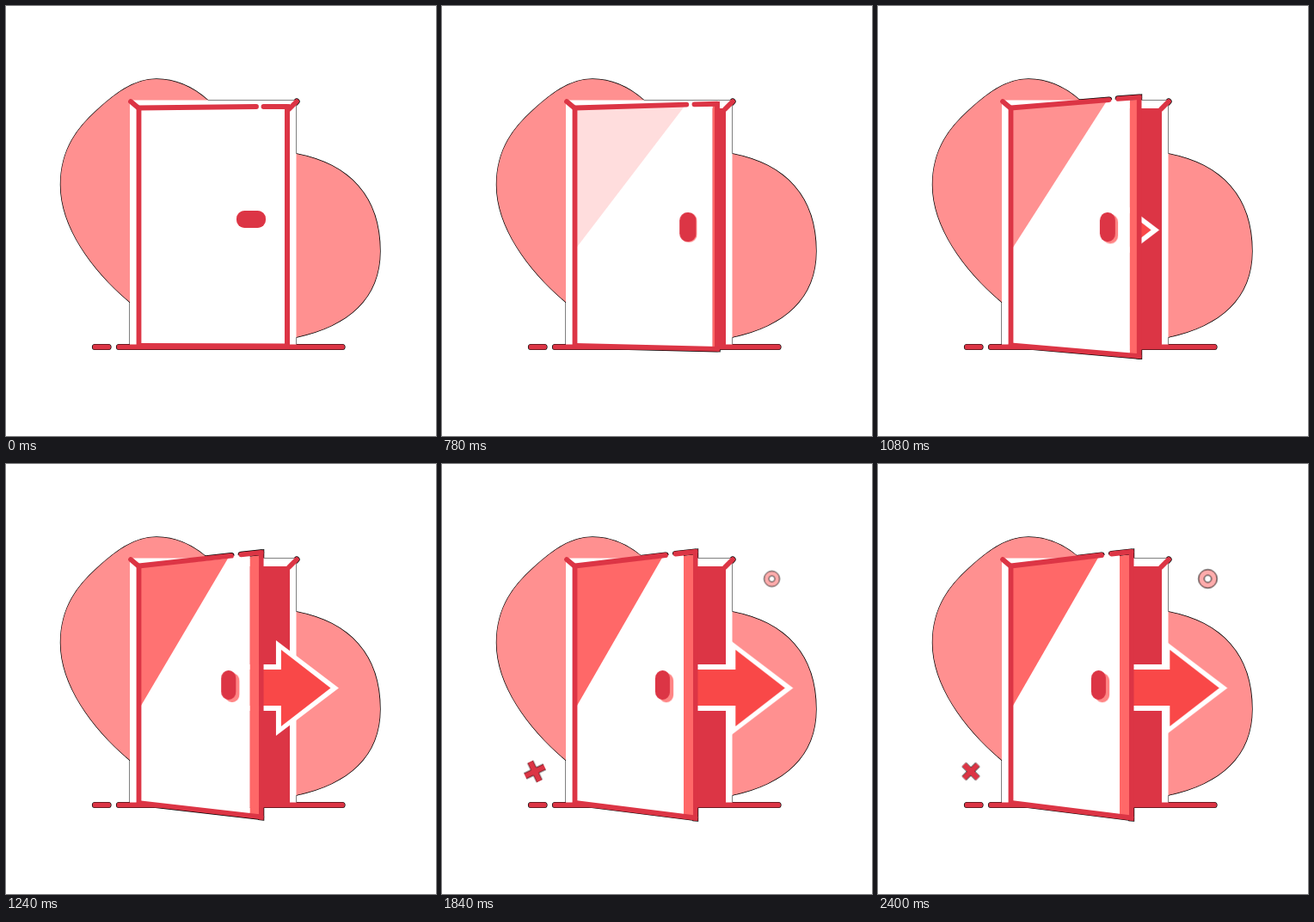
An HTML page without scripts that plays this animation: 500 by 500 pixels, repeating every 2420 ms.

```html
<!DOCTYPE html>
<html lang="en">
<head>
<meta charset="utf-8">
<title>Opening door</title>
<style>
html, body { margin: 0; width: 100%; height: 100%; overflow: hidden; background: #fff; }
svg { display: block; width: 100%; height: 100%; }

.red { fill: #dc3545; }
.pink { fill: #ff6868; }
.white { fill: #fff; }
.line { fill: none; stroke: #dc3545; stroke-width: 5.8; stroke-linecap: round; }
.rim { fill: #000; stroke: #000; stroke-width: 1.4; }
.rim .line { stroke: #000; stroke-width: 7.2; }

.move { animation: 2.42s linear infinite; }
.face { animation-name: face; }
.shine { animation-name: shine; }
.side { animation-name: side; }
.edge { animation-name: edge; }
.top { animation-name: top; }
.bottom { animation-name: bottom; }
.slide { animation-name: slide; }
.turn { animation-name: turn; }
.depth { animation-name: depth; }
.arrow { animation-name: arrow; }
.cross { animation-name: cross; }
.ring { animation-name: ring; }

/* The door swings from 600 to 1340 ms */
.swing { animation-timing-function: cubic-bezier(.3, .15, .7, .95); }
@keyframes face {
  0%, 24.8% { d: path("M154 118L324 117L324 395L154 395Z"); }
  55.4%, 100% { d: path("M154 118L281 104L281 409L154 394Z"); }
}
@keyframes shine {
  0%, 24.8% { d: path("M157 120L289 119L157 280Z"); opacity: 0; }
  55.4%, 100% { d: path("M157 120L256 109L157 281Z"); opacity: 1; }
}
@keyframes side {
  0%, 24.8% { d: path("M324 117L325 117L325 395L324 395Z"); }
  55.4%, 100% { d: path("M281 107L292.5 105.5L292.5 410L281 408Z"); }
}
@keyframes edge {
  0%, 24.8% { d: path("M324 115L330 114L330 398L324 397Z"); }
  55.4%, 100% { d: path("M292 100L297.5 99L297.5 415L292 414.5Z"); }
}
@keyframes top {
  0%, 24.8% { d: path("M154.5 118.5L291 117M299.5 117L327 117"); }
  55.4%, 100% { d: path("M154.5 118.5L260 106M271.5 104.5L294.5 102"); }
}
@keyframes bottom {
  0%, 24.8% { d: path("M154.5 395L327 395.5"); }
  55.4%, 100% { d: path("M154.5 394L294.5 411.5"); }
}
@keyframes slide {
  0%, 24.8% { transform: translate(294px, 248px) scaleX(1); }
  55.4%, 100% { transform: translate(256.5px, 248px) scaleX(.86); }
}
@keyframes depth {
  0%, 24.8% { transform: none; }
  55.4%, 100% { transform: translate(5px, 3.2px); }
}
@keyframes turn {
  0%, 4.13% { transform: rotate(0deg); animation-timing-function: ease-in-out; }
  24.4%, 100% { transform: rotate(-90deg); }
}
@keyframes arrow {
  0%, 37.2% { transform: translateX(-130px); animation-timing-function: cubic-bezier(.33, 0, .4, 1); }
  60.6% { transform: none; animation-timing-function: ease-in-out; }
  86.8%, 100% { transform: translateX(-5.7px); }
}
@keyframes cross {
  0%, 56.2% { transform: rotate(-45deg) scale(0); }
  63.6% { transform: rotate(8deg) scale(.93); animation-timing-function: ease-out; }
  73.6% { transform: rotate(65deg) scale(1.1); animation-timing-function: ease-in-out; }
  92.6%, 100% { transform: rotate(45deg) scale(1); }
}
@keyframes ring {
  0%, 68.6% { transform: scale(0); }
  76.9% { transform: scale(.93); animation-timing-function: ease-out; }
  86% { transform: scale(1.1); animation-timing-function: ease-in-out; }
  99%, 100% { transform: scale(1); }
}
</style>
</head>
<body>
<svg viewBox="0 0 500 500">
  <defs>
    <path id="blob" d="M175 85C198 85 218 95 234 109C270 140 290 163 338 172C400 184 435 222 435 285C435 340 398 372 338 385C270 400 200 395 143 343.5C100 307 63.5 257 63.5 208C63.5 165 85 140 106 121C125 104 147 85 175 85Z"/>
    <path id="frame" d="M144 109.5H337.5V394H144Z"/>
    <path id="ground" d="M103.5 396.5H119M131.5 396.5H391"/>
    <path id="corners" d="M145 111L154.5 119M338 111L329 120"/>
    <rect id="handle" x="-26" y="-10" width="34" height="20" rx="9.5"/>
    <path id="plus" d="M-11.3 0H11.3M0 -11.3V11.3"/>
  </defs>

  <!-- Thin dark rim around every outer contour -->
  <g class="rim">
    <use href="#blob"/>
    <use href="#frame" stroke-width="1"/>
    <use href="#ground" class="line"/>
    <use href="#corners" class="line"/>
    <path class="move swing edge"/>
    <path class="line move swing top"/>
    <path class="line move swing bottom"/>
  </g>

  <use href="#blob" fill="#ff9090"/>
  <use href="#frame" class="white"/>
  <use href="#ground" class="line"/>
  <path class="red" d="M154 119H330V395H154Z"/>
  <use href="#corners" class="line"/>

  <g class="move arrow">
    <path class="white" d="M285 233H339V205L412 260.5L339 316V287H285Z"/>
    <path fill="#f94848" d="M285 239H345V216L402.5 260.5L345 305V281H285Z"/>
  </g>

  <path class="white move swing face"/>
  <path class="pink move swing shine"/>
  <path class="pink move swing side"/>
  <path class="red move swing edge"/>
  <path class="line move swing top"/>
  <path class="line move swing bottom"/>
  <path class="line" d="M154.5 119V393"/>

  <g class="move swing slide">
    <g class="move swing depth"><use href="#handle" fill="#ff8585" class="move turn"/></g>
    <use href="#handle" class="red move turn"/>
  </g>

  <g transform="translate(108 357.5)">
    <g class="move cross">
      <use href="#plus" stroke="#000" stroke-width="7"/>
      <use href="#plus" stroke="#dc3545" stroke-width="5.8"/>
    </g>
  </g>
  <g transform="translate(383.5 133.5)">
    <g class="move ring" stroke="#000" stroke-width=".9">
      <circle r="10.8" fill="#ffacac"/>
      <circle r="4.2" fill="#fff"/>
    </g>
  </g>
</svg>
</body>
</html>
```
